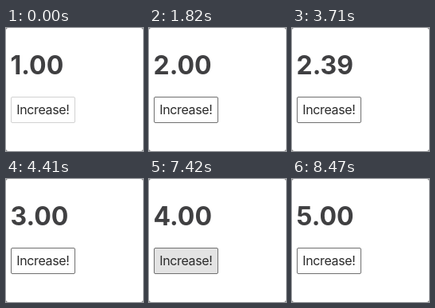
An HTML page for the animation above (9100 ms loop, 172x154 px).

```html
<!DOCTYPE html>
<html lang="en">
<head>
<meta charset="utf-8">
<title>Counter</title>
<style>
  html, body { margin: 0; width: 100%; height: 100%; overflow: hidden; background: #777; }
  svg { display: block; width: 172px; height: 154px; }
  text { font-family: Inter, sans-serif; }
  #count { font-size: 32px; font-weight: 700; fill: #404042; }
  #label { font-size: 16px; letter-spacing: -.35px; fill: #2b2b2b; }
  #button { fill: #fff; stroke: #d2d2d2; }
  #button.focus { stroke: #707070; }
  #button.press { fill: #e3e3e3; }
</style>
</head>
<body>
<svg viewBox="0 0 172 154">
  <rect width="172" height="154" rx="3" fill="#fff"/>
  <text id="count" x="5.5" y="58">1.00</text>
  <rect id="button" x="6.5" y="86.5" width="80" height="32" rx="1.5"/>
  <text id="label" x="13.2" y="108">Increase!</text>
</svg>
<script>
  const LOOP = 9100, STEP = 70;
  // Each click: press time, then [elapsed ms, progress] points.
  const clicks = [
    { at: 770, path: [[0, 0], [1050, 1]] },
    { at: 3290, path: [[0, 0], [420, .39], [1120, 1]] },
    { at: 5250, path: [[0, 0], [560, .51], [1050, 1]] },
    { at: 7420, path: [[0, 0], [1050, 1]] }
  ];
  const count = document.getElementById('count');
  const button = document.getElementById('button');

  function progress(path, t) {
    if (t <= 0) return 0;
    for (let i = 1; i < path.length; i++) {
      const [t0, v0] = path[i - 1], [t1, v1] = path[i];
      if (t < t1) return v0 + (v1 - v0) * (t - t0) / (t1 - t0);
    }
    return 1;
  }

  function draw(elapsed) {
    const t = Math.floor((elapsed % LOOP) / STEP) * STEP;
    const value = clicks.reduce((sum, c) => sum + progress(c.path, t - c.at), 1);
    count.textContent = value.toFixed(2);
    button.classList.toggle('focus', t >= clicks[0].at);
    button.classList.toggle('press', clicks.some(c => t >= c.at && t < c.at + STEP));
  }

  const start = performance.now();
  function tick() {
    draw(performance.now() - start);
    requestAnimationFrame(tick);
  }
  tick();
</script>
</body>
</html>
```
